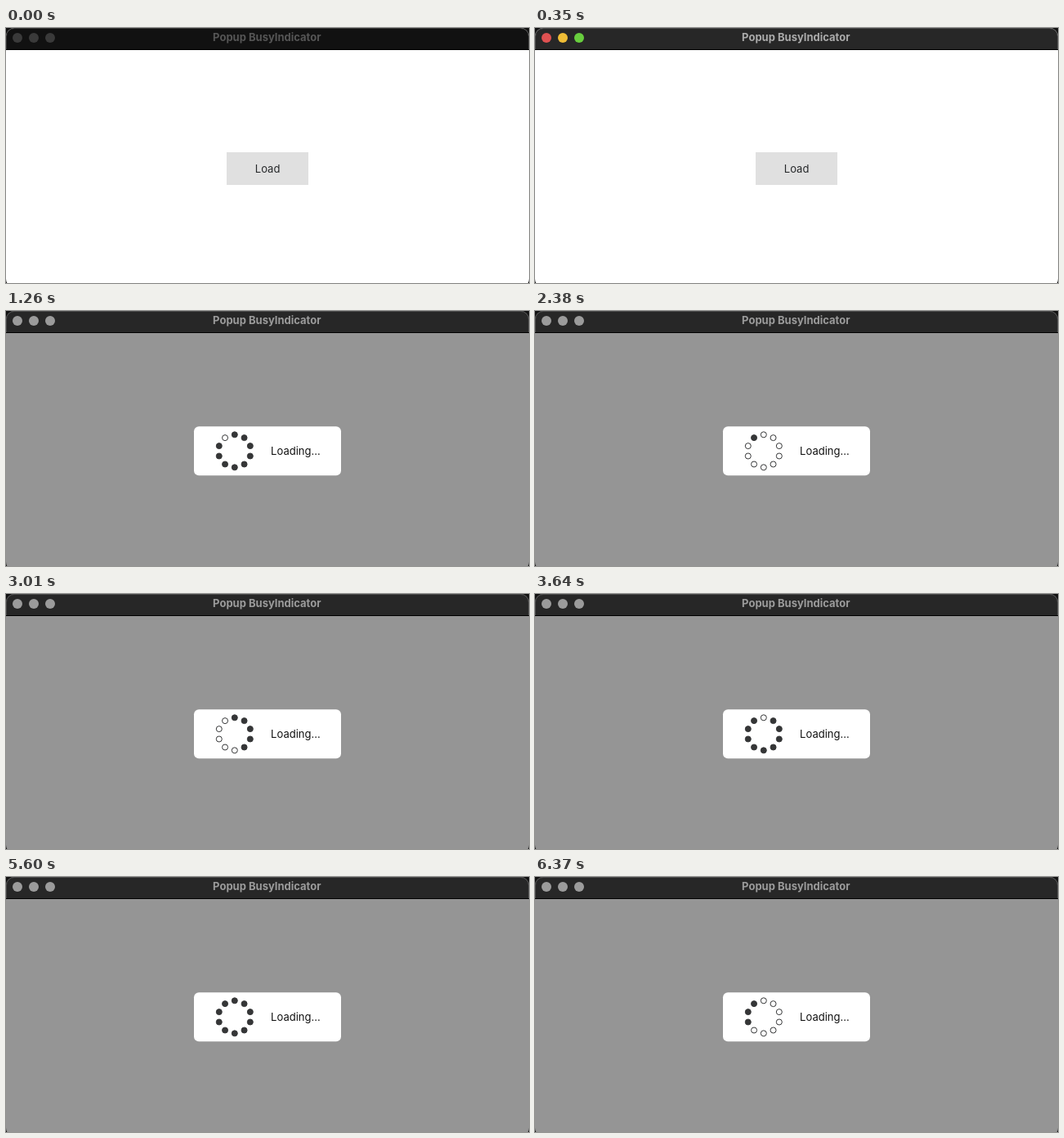
These frames come from a looping animation (640 px wide and 312 px high, 6440 ms). An HTML page:

```html
<!DOCTYPE html>
<html lang="en">
<head>
<meta charset="utf-8">
<title>Busy popup</title>
<style>
  html, body { margin: 0; width: 100%; height: 100%; overflow: hidden; background: #111; }
  svg { display: block; width: 640px; height: 312px; }
  text { font: 400 13px Inter, "Open Sans", sans-serif; text-anchor: middle; fill: #26282a; }
  #title { font-weight: 700; fill: var(--title); }
  #bar { fill: var(--bar); }
  .idle { --bar: #111; --title: #555; --a: #3a3a3a; --b: #3a3a3a; --c: #3a3a3a; --page: #fff; }
  .active { --bar: #272727; --title: #ababab; --a: #df5151; --b: #efbd36; --c: #68ce3e; --page: #fff; }
  .busy { --bar: #272727; --title: #9b9b9b; --a: #9b9b9b; --b: #9b9b9b; --c: #9b9b9b; --page: #959595; }
  #popup { visibility: hidden; }
  .busy #popup { visibility: visible; }
  .busy #load { visibility: hidden; }
  #popup text { fill: #111; }
  #spinner circle { stroke: #353637; stroke-width: 1; }
</style>
</head>
<body>
<svg id="stage" class="idle" viewBox="0 0 640 312">
  <defs>
    <clipPath id="frame"><rect width="640" height="317" rx="10"/></clipPath>
  </defs>
  <rect width="640" height="312" fill="#111"/>
  <g clip-path="url(#frame)">
    <rect width="640" height="317" fill="var(--page)"/>
    <rect id="bar" width="640" height="26"/>
    <rect y="26" width="640" height="1" fill="#000"/>
  </g>
  <path d="M.5 26V10A9.5 9.5 0 0 1 10 .5H630A9.5 9.5 0 0 1 639.5 10V26" fill="none" stroke="#fff" stroke-opacity=".16"/>
  <circle cx="14" cy="12" r="6" fill="var(--a)"/>
  <circle cx="34" cy="12" r="6" fill="var(--b)"/>
  <circle cx="54" cy="12" r="6" fill="var(--c)"/>
  <text id="title" x="319.3" y="16">Popup BusyIndicator</text>
  <g id="load">
    <rect x="270" y="152" width="100" height="40" fill="#e0e0e0"/>
    <text x="320.1" y="176.5">Load</text>
  </g>
  <g id="popup">
    <rect x="230" y="141.3" width="180" height="60" rx="6" fill="#fff"/>
    <text x="354.4" y="176">Loading...</text>
    <g id="spinner"></g>
  </g>
</svg>
<script>
  const LOOP = 6440, TICK = 70;
  const ACTIVE_AT = 350, POPUP_AT = 490, FADE = 262;
  const SPIN_AT = 418, STEP = 105.2, COUNT = 10;

  const stage = document.getElementById("stage");
  const spinner = document.getElementById("spinner");

  const dots = Array.from({ length: COUNT }, (_, i) => {
    const dot = document.createElementNS("http://www.w3.org/2000/svg", "circle");
    const angle = i / COUNT * 2 * Math.PI;
    dot.setAttribute("cx", 279.8 + 20 * Math.sin(angle));
    dot.setAttribute("cy", 171.3 - 20 * Math.cos(angle));
    dot.setAttribute("r", 3.5);
    return spinner.appendChild(dot);
  });

  function draw(ms) {
    const t = Math.floor(ms % LOOP / TICK) * TICK;
    stage.setAttribute("class", t < ACTIVE_AT ? "idle" : t < POPUP_AT ? "active" : "busy");
    if (t < POPUP_AT) return;

    spinner.setAttribute("opacity", Math.min(1, (t - POPUP_AT) / FADE));
    // The ring fills clockwise, then empties clockwise.
    const step = Math.floor((t - SPIN_AT) / STEP) % (2 * COUNT);
    dots.forEach((dot, i) => {
      const filled = step < COUNT ? i <= step : i > step - COUNT;
      dot.setAttribute("fill", filled ? "#353637" : "none");
    });
  }

  const start = performance.now();
  function loop() {
    draw(performance.now() - start);
    requestAnimationFrame(loop);
  }
  loop();
</script>
</body>
</html>
```
